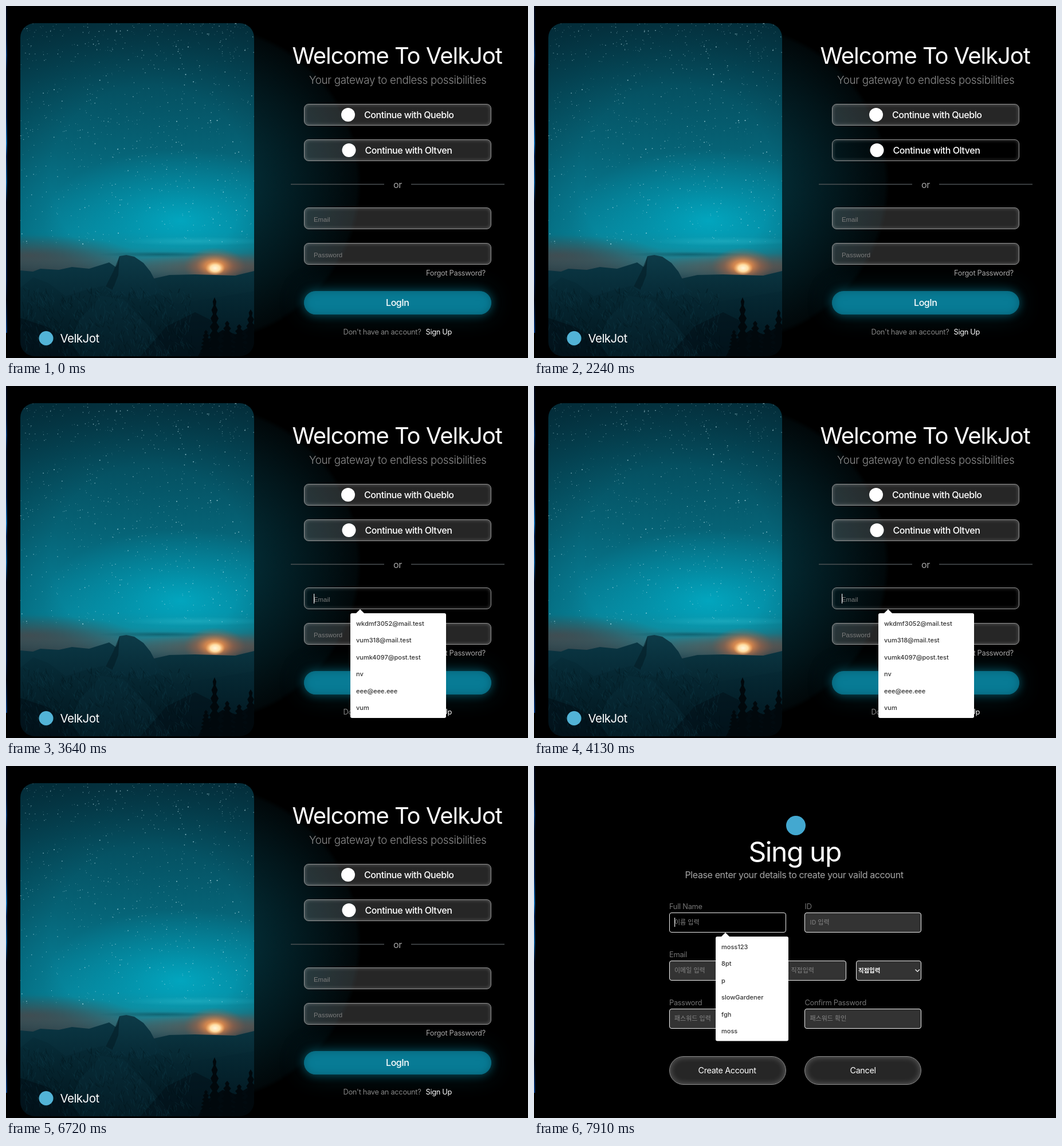
Write an HTML page with a canvas that moves like this. It is 911 px wide and 615 px high and loops after 8 s.

```html
<!DOCTYPE html>
<html lang="ko">
<head>
<meta charset="utf-8">
<title>Login and sign up</title>
<style>
html, body { margin: 0; width: 100%; height: 100%; overflow: hidden; background: #000; }
#stage { position: relative; width: 911px; height: 615px; overflow: hidden; background: #000; }
.page, .page > * { position: absolute; box-sizing: border-box; }
.page, svg { left: 0; top: 0; width: 911px; height: 615px; }
#login { background: radial-gradient(circle 277px at 343px 310px, #05343f, #03272f 36%, #02161b 70%, #01080a 97%, #000); }
#signup { background: #000; opacity: 0; }
#strip {
  position: absolute; left: 0; top: 0; width: 2px; height: 571px;
  background: linear-gradient(#020818, #04173a 10%, #0a3a78 15%, #041430 20%, #06265a 34%,
    #1370b8 42%, #06265a 46%, #0d5a98 54%, #030d24 60%, #041c48 84%, #020818 90%, #0b3f86);
}
#photo { left: 25px; top: 30px; border-radius: 25px; }

.box {
  --lit: rgba(255, 255, 255, .15);
  left: 520px; width: 327px; height: 38px;
  border: 1px solid #929292; border-radius: 8px;
  background: var(--lit);
  box-shadow: inset 0 0 6px rgba(255, 255, 255, .3);
}
#enter {
  --lit: #087b95;
  left: 520px; top: 498px; width: 327px; height: 41px; border-radius: 21px;
  background: var(--lit);
  box-shadow: 0 0 16px #075363, 0 0 44px rgba(8, 90, 108, .4), inset 0 0 14px rgba(8, 76, 92, .6);
}
.field {
  --lit: #333;
  height: 35px; border: 1px solid #eee; border-radius: 4px; background: var(--lit);
}
.pill {
  top: 507px; width: 204px; height: 50px;
  border: 1px solid #8c8c8c; border-radius: 25px; background: #262626;
  box-shadow: inset 0 0 11px rgba(255, 255, 255, .3);
}
.left { left: 236px; width: 204px; }
.right { left: 472px; width: 204px; }

text { font: 12.8px Inter, "Noto Sans CJK KR", "Noto Sans CJK", sans-serif; font-optical-sizing: none; letter-spacing: -.29px; fill: #fff; }
text.title { font-size: 40px; letter-spacing: -1.05px; }
text.big { font-size: 48px; letter-spacing: -1.45px; }
text.lead { font-size: 18.7px; font-weight: 300; letter-spacing: -.25px; fill: #8e8e8e; }
text.brand { font-size: 20.5px; letter-spacing: -.55px; }
text.btn { font-size: 16px; font-weight: 500; letter-spacing: -.42px; }
text.note { font-size: 16px; letter-spacing: -.38px; }
text.act { font-size: 14.4px; letter-spacing: -.36px; }
text.hint { font: 11.4px "Liberation Sans", Arial, sans-serif; letter-spacing: 0; fill: #7c7c7c; }
text.ko { font: 11px "Noto Sans CJK KR", "Noto Sans CJK", sans-serif; letter-spacing: 0; fill: #858585; }
text.pick { font-weight: 700; font-size: 10.4px; fill: #fff; }
text.soft { fill: #a6a6a6; }
text.dim { fill: #858585; }
text.label { fill: #757575; letter-spacing: -.25px; }
.menu { fill: #fff; }
.menu text { font-size: 11px; font-weight: 500; letter-spacing: 0; fill: #333; }
.caret { fill: #e8e8e8; }
.menu, .caret { opacity: 0; }

.anim { animation: 8s step-end infinite; }
#first { animation-name: first; }
#second { animation-name: second; }
#mail { animation-name: mail; }
#pass { animation-name: pass; }
#enter { animation-name: enter; }
#mailMenu { animation-name: mailMenu; }
#mailCaret { animation-name: mailCaret; }
#passCaret { animation-name: passCaret; }
#signup { animation-name: signup; }
#name { animation-name: name; }
#nameMenu, #nameCaret { animation-name: nameMenu; }
@keyframes first { 21% { background: transparent } 28% { background: var(--lit) } }
@keyframes second { 28% { background: transparent } 34.125% { background: var(--lit) } }
@keyframes mail { 44.625% { background: transparent } 53.375% { background: var(--lit) } }
@keyframes pass { 53.375% { background: transparent } 83.125% { background: var(--lit) } }
@keyframes enter {
  48.125%, 59.5% { background: #010b0f }
  49.875%, 66.5% { background: var(--lit) }
}
@keyframes mailMenu { 45.5% { opacity: 1 } 53.375% { opacity: 0 } }
@keyframes mailCaret { 45.5% { opacity: 1 } 52.125% { opacity: 0 } }
@keyframes passCaret { 53.375%, 66.5%, 79.625% { opacity: 1 } 59.5%, 72.625%, 83.125% { opacity: 0 } }
@keyframes signup { 84.875%, 100% { opacity: 1 } }
@keyframes name { 98.875%, 100% { background: #000 } }
@keyframes nameMenu { 98.875%, 100% { opacity: 1 } }
</style>
</head>
<body>
<div id="stage">
  <div id="login" class="page">
    <canvas id="photo" width="408" height="582"></canvas>
    <div id="first" class="box anim" style="top:171px"></div>
    <div id="second" class="box anim" style="top:233px"></div>
    <div id="mail" class="box anim" style="top:352px"></div>
    <div id="pass" class="box anim" style="top:414px"></div>
    <div id="enter" class="anim"></div>
    <svg viewBox="0 0 911 615">
      <circle cx="70" cy="580.5" r="12.5" fill="#52b3d6"/>
      <text class="brand" x="94.500" y="588">VelkJot</text>
      <text class="title" x="499.500" y="101">Welcome To VelkJot</text>
      <text class="lead" x="529" y="136">Your gateway to endless possibilities</text>
      <circle cx="597" cy="190" r="12" fill="#fff"/>
      <text class="btn" x="625" y="196">Continue with Queblo</text>
      <circle cx="598.500" cy="252" r="12" fill="#fff"/>
      <text class="btn" x="626.500" y="258">Continue with Oltven</text>
      <path d="M497 311.500H660M707 311.500H870" stroke="#4c5254" stroke-width="1.500"/>
      <text class="note soft" x="676" y="318">or</text>
      <text class="hint" x="537" y="377">Email</text>
      <text class="hint" x="537" y="439">Password</text>
      <text class="soft" x="733" y="471">Forgot Password?</text>
      <text class="btn" x="663" y="524">LogIn</text>
      <text class="dim" x="588.500" y="574">Don't have an account?</text>
      <text x="732.500" y="574">Sign Up</text>
      <rect id="mailCaret" class="caret anim" x="537" y="363" width="1.200" height="17"/>
      <rect id="passCaret" class="caret anim" x="537" y="425" width="1.200" height="17"/>
      <g id="mailMenu" class="menu anim">
        <rect x="601" y="397" width="167" height="183" rx="3"/>
        <path d="M610.500 397.500L618 390L625.500 397.500Z"/>
        <text y="419"><tspan x="611">wkdmf3052@mail.test</tspan><tspan x="611" dy="29.400">vum318@mail.test</tspan><tspan x="611" dy="29.400">vumk4097@post.test</tspan><tspan x="611" dy="29.400">nv</tspan><tspan x="611" dy="29.400">eee@eee.eee</tspan><tspan x="611" dy="29.400">vum</tspan></text>
      </g>
    </svg>
  </div>

  <div id="signup" class="page anim">
    <div id="name" class="field left anim" style="top:256px"></div>
    <div class="field right" style="top:256px"></div>
    <div class="field" style="top:340px;left:236px;width:139px"></div>
    <div class="field" style="top:340px;left:406px;width:139px"></div>
    <div class="field" style="top:340px;left:562px;width:114px"></div>
    <div class="field left" style="top:424px"></div>
    <div class="field right" style="top:424px"></div>
    <div class="pill left"></div>
    <div class="pill right"></div>
    <svg viewBox="0 0 911 615">
      <circle cx="457" cy="104" r="17" fill="#43a8d0"/>
      <text class="big" x="374.500" y="167">Sing up</text>
      <text class="note soft" x="263.500" y="196">Please enter your details to create your vaild account</text>
      <text class="label" x="236" y="250">Full Name</text>
      <text class="label" x="472.500" y="250">ID</text>
      <text class="label" x="236" y="334">Email</text>
      <text class="label" x="236" y="418">Password</text>
      <text class="label" x="472.500" y="418">Confirm Password</text>
      <text class="ko" x="245" y="277">이름 입력</text>
      <text class="ko" x="481.500" y="277">ID 입력</text>
      <text class="ko" x="245" y="361">이메일 입력</text>
      <text style="font-size:21px" x="380" y="365">@</text>
      <text class="ko" x="415" y="361">도메인 직접입력</text>
      <text class="ko pick" x="566" y="361">직접입력</text>
      <path d="M665.500 355.500l3.700 3.700l3.700-3.700" fill="none" stroke="#fff" stroke-width="1.200"/>
      <text class="ko" x="245" y="445">패스워드 입력</text>
      <text class="ko" x="481.500" y="445">패스워드 확인</text>
      <text class="act" x="286.500" y="537">Create Account</text>
      <text class="act" x="551.500" y="537">Cancel</text>
      <rect id="nameCaret" class="caret anim" x="245" y="265" width="1.200" height="16"/>
      <g id="nameMenu" class="menu anim">
        <rect x="317" y="298" width="127" height="182.500" rx="3"/>
        <path d="M326.500 298.500L334 291L341.500 298.500Z"/>
        <text y="320"><tspan x="327">moss123</tspan><tspan x="327" dy="29.400">8pt</tspan><tspan x="327" dy="29.400">p</tspan><tspan x="327" dy="29.400">slowGardener</tspan><tspan x="327" dy="29.400">fgh</tspan><tspan x="327" dy="29.400">moss</tspan></text>
      </g>
    </svg>
  </div>
  <div id="strip"></div>
</div>

<script>
const ctx = document.getElementById('photo').getContext('2d');
ctx.translate(-25, -30);

let seed = 7;
const rand = () => (seed = seed * 16807 % 2147483647) / 2147483647;

function fade(gradient, ...stops) {
  stops.forEach(([at, color]) => gradient.addColorStop(at, color));
  return gradient;
}
const down = (y0, y1, ...stops) => fade(ctx.createLinearGradient(0, y0, 0, y1), ...stops);

function glow(x, y, rx, ry, ...stops) {
  ctx.save();
  ctx.translate(x, y);
  ctx.scale(1, ry / rx);
  ctx.fillStyle = fade(ctx.createRadialGradient(0, 0, 0, 0, 0, rx), ...stops);
  ctx.fillRect(-rx, -rx, 2 * rx, 2 * rx);
  ctx.restore();
}

function shape(path, fill) {
  ctx.fillStyle = fill;
  ctx.fill(new Path2D(path));
}

function tree(x, top, spread) {
  ctx.fillStyle = '#01080c';
  ctx.beginPath();
  ctx.moveTo(x, top);
  for (const side of [1, -1]) {
    for (let i = 0; i <= 14; i++) {
      const k = side > 0 ? i : 14 - i;
      const reach = spread * Math.sqrt(k / 14) * (k % 2 ? .9 : .4);
      ctx.lineTo(x + side * reach, top + (612 - top) * k / 14);
    }
  }
  ctx.fill();
}

// Sky
ctx.fillStyle = down(30, 475, [0, '#053a48'], [.25, '#055061'], [.5, '#066376'], [.7, '#06778d'],
  [.82, '#078298'], [.88, '#127f90'], [.93, '#35666f'], [1, '#343f46']);
ctx.fillRect(25, 30, 408, 582);
glow(305, 375, 240, 125, [0, 'rgba(0,182,208,.7)'], [.5, 'rgba(0,172,198,.35)'], [1, 'rgba(0,172,198,0)']);
glow(250, 300, 430, 400, [0, 'rgba(0,20,30,0)'], [.4, 'rgba(0,20,30,0)'], [1, 'rgba(0,20,30,.55)']);
glow(40, 436, 190, 36, [0, 'rgba(68,74,78,.85)'], [1, 'rgba(68,74,78,0)']);
glow(375, 455, 170, 24, [0, 'rgba(112,80,70,.8)'], [1, 'rgba(112,80,70,0)']);
glow(330, 411, 130, 8, [0, 'rgba(40,178,196,.55)'], [1, 'rgba(40,178,196,0)']);
glow(270, 434, 110, 5, [0, 'rgba(10,72,84,.55)'], [1, 'rgba(10,72,84,0)']);

for (let i = 0; i < 900; i++) {
  const x = 25 + rand() * 408, y = 30 + Math.pow(rand(), 1.35) * 385;
  const size = .7 + rand() * rand() * 1.1;
  ctx.fillStyle = `rgba(195,235,242,${.2 + rand() * .65})`;
  ctx.fillRect(x, y, size, size);
}

// Setting sun
glow(364, 454, 54, 32, [0, 'rgba(255,170,95,.95)'], [.3, 'rgba(236,142,76,.8)'],
  [.6, 'rgba(176,104,70,.45)'], [1, 'rgba(140,90,70,0)']);
glow(365, 458, 17, 12, [0, '#fff6dd'], [.5, '#ffdfa6'], [1, 'rgba(255,180,100,0)']);

// Ridges
shape('M250 478L285 470L330 469L400 471L433 463V612H250Z', down(463, 560, [0, '#0a3440'], [1, '#031c25']));
shape('M25 462L47 464L60 459L92 461L115 456L145 459L180 448L200 462L280 520V612H25Z',
  down(448, 590, [0, '#0a3643'], [1, '#031a24']));
shape('M25 492L48 474L74 484L104 507L132 498L170 489L214 491L262 501L300 520L350 512L433 498V612H25Z',
  down(474, 612, [0, '#072d39'], [.5, '#04212b'], [1, '#02141c']));
shape('M172 490L184 468L194 452L198 437L210 435L224 438L240 449L252 464L262 483L270 500L235 512L190 505Z',
  down(435, 512, [0, '#0d3b48'], [1, '#062935']));
shape('M198 437L188 462L174 490L186 496L196 470Z', 'rgba(2,24,33,.5)');
shape('M100 612L128 548L166 506L205 512L250 560L290 612Z', 'rgba(12,52,65,.3)');
shape('M25 545L70 560L108 580L130 612H25Z', 'rgba(2,18,26,.7)');
shape('M235 612L280 560L330 535L360 550L345 612Z', 'rgba(2,18,26,.6)');

// Rock texture
for (let i = 0; i < 700; i++) {
  const x = 25 + rand() * 300, y = 490 + rand() * 122, lean = rand() * 14 - 5;
  ctx.strokeStyle = rand() < .5 ? 'rgba(20,72,86,.28)' : 'rgba(0,10,16,.3)';
  ctx.beginPath();
  ctx.moveTo(x, y);
  ctx.lineTo(x + lean, y + 4 + rand() * 9);
  ctx.stroke();
}

// Pines
shape('M335 612L350 584L378 566L402 574L433 556V612Z', '#010a0f');
[[364, 509, 13], [386, 550, 16], [407, 556, 17], [427, 530, 14], [349, 566, 13]]
  .forEach(([x, top, spread]) => tree(x, top, spread));
</script>
</body>
</html>
```
